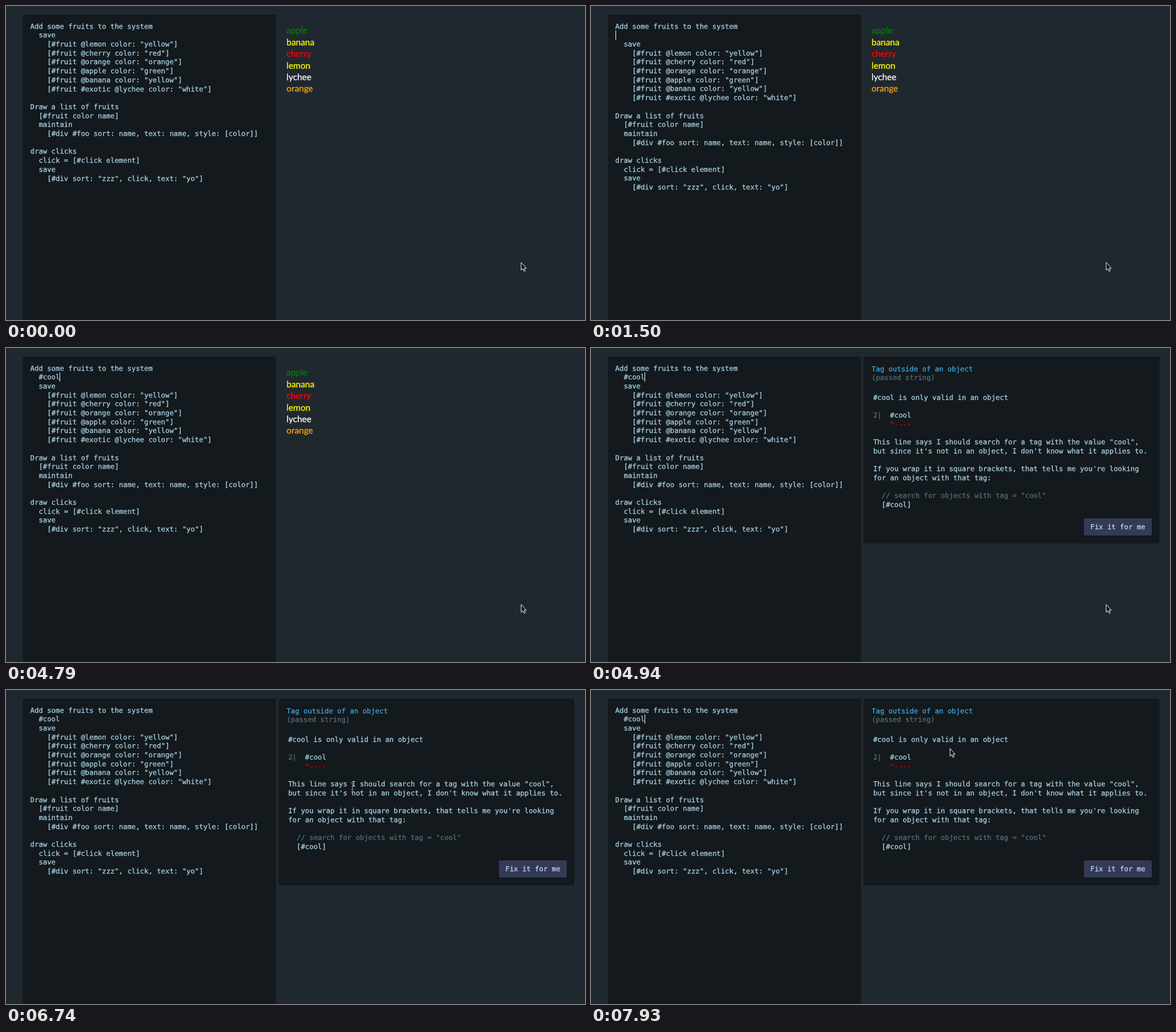
Animation of 1016 by 551 pixels, one loop 8000 ms. Source, as an HTML page:

```html
<!DOCTYPE html>
<html lang="en">
<head>
<meta charset="utf-8">
<title>Live editor</title>
<style>
  html, body { margin: 0; width: 100%; height: 100%; overflow: hidden; background: #20282f; }
  svg { display: block; }
  /* The thin stroke in the text colour gives the heavier, smoothed look. */
  text {
    font: 12.31px "DejaVu Sans Mono", monospace;
    fill: currentColor;
    stroke: currentColor;
    stroke-width: .3px;
    color: #a8d0e6;
    text-rendering: geometricPrecision;
  }
  #fruits text { font: 15.4px Lato, sans-serif; }
  .panel { fill: #13191c; }
</style>
</head>
<body>
<svg id="stage" width="1016" height="551" viewBox="0 0 1016 551">
  <rect class="panel" x="29.7" y="15" width="444" height="550" rx="3"/>
  <g id="code"></g>
  <g id="rest"></g>
  <rect id="caret" width="1" fill="#fff"/>
  <g id="fruits"></g>
  <g id="error">
    <rect class="panel" x="478.5" y="15" width="519" height="328" rx="3"/>
    <rect x="865" y="299" width="119" height="30" rx="2" fill="#343a56"/>
  </g>
  <path id="arrow" d="M0 0V13.6L3 10.9L5.1 15.6L7.2 14.7L5.2 10.2H8.9Z"
        fill="#0b0d0f" stroke="#fff" stroke-linejoin="round"/>
  <path id="beam" d="M-3 -8Q0 -8 0 -6Q0 -8 3 -8M0 -6V6M-3 8Q0 8 0 6Q0 8 3 8M-2 3H2"
        fill="none" stroke="#8a9298"/>
</svg>
<script>
const LOOP = 8000, CHAR = 7.41, LINE = 15.7, LEFT = 42.6, TOP = 39.6;
const $ = id => document.getElementById(id);

function addText(parent, x, y, str, color) {
  const el = document.createElementNS("http://www.w3.org/2000/svg", "text");
  const indent = str.length - str.trimStart().length;
  el.setAttribute("x", x + indent * CHAR);
  el.setAttribute("y", y);
  if (color) el.style.color = color;
  el.textContent = str.trimStart();
  parent.append(el);
  return el;
}

// Editor
const heading = "Add some fruits to the system";
addText($("code"), LEFT, TOP, heading);
const typedLine = addText($("code"), LEFT + 2 * CHAR, TOP + LINE, "");
`  save
    [#fruit @lemon color: "yellow"]
    [#fruit @cherry color: "red"]
    [#fruit @orange color: "orange"]
    [#fruit @apple color: "green"]
    [#fruit @banana color: "yellow"]
    [#fruit #exotic @lychee color: "white"]

Draw a list of fruits
  [#fruit color name]
  maintain
    [#div #foo sort: name, text: name, style: [color]]

draw clicks
  click = [#click element]
  save
    [#div sort: "zzz", click, text: "yo"]`
  .split("\n").forEach((s, i) => addText($("rest"), LEFT, TOP + LINE * (i + 1), s));

// Rendered list
[["apple", "green"], ["banana", "yellow"], ["cherry", "red"],
 ["lemon", "yellow"], ["lychee", "white"], ["orange", "orange"]]
  .forEach(([name, color], i) => addText($("fruits"), 492.3, 48.4 + 20.4 * i, name, color));

// Error message
const GREY = "#526d7d";
const say = (row, str, color) => addText($("error"), 495.2, 90.6 + LINE * row, str, color);
addText($("error"), 492.4, 40.8, "Tag outside of an object", "#40a5e0");
addText($("error"), 492.4, 56.4, "(passed string)", GREY);
say(0, "#cool is only valid in an object");
say(2, "2|", GREY);
say(2, "    #cool");
say(3.05, "    ^----", "#e80000");
say(5, 'This line says I should search for a tag with the value "cool",');
say(6, "but since it's not in an object, I don't know what it applies to.");
say(8, "If you wrap it in square brackets, that tells me you're looking");
say(9, "for an object with that tag:");
say(11, '  // search for objects with tag = "cool"', GREY);
say(12, "  [#cool]");
addText($("error"), 876.3, 318.2, "Fix it for me", "#b9d9ec");

// Timeline
const typed = "\n  #cool";
const keyTimes = [1500, 2850, 3000, 3300, 3590, 3740, 3890, 4040];
const blinkTimes = [150, 600, 1200, 2100, 2550, 4640, 4790, 5390, 5840, 6440, 6890, 7480, 7930];
const errorTime = 4940;
const pointer = [
  [0, 904, 450], [6590, 765, 285], [6740, 608, 171, "beam"], [6890, 606, 128],
  [7040, 614, 110], [7190, 621, 106], [7340, 625, 104], [7480, 627, 104],
  [7630, 628, 103], [7780, 629, 103], [7930, 630, 102.5]
];
const passed = (times, t) => times.filter(at => at <= t).length;
const show = (el, on) => el.setAttribute("visibility", on ? "visible" : "hidden");
const move = (el, x, y) => el.setAttribute("transform", `translate(${x} ${y})`);

function draw(t) {
  const keys = passed(keyTimes, t);
  const line = typed.slice(1, Math.max(1, keys));
  typedLine.textContent = line.trim();
  move($("rest"), 0, keys ? LINE : 0);

  const caret = $("caret");
  const column = keys ? line.length : heading.length;
  caret.setAttribute("x", Math.round(LEFT + column * CHAR));
  caret.setAttribute("y", keys ? 43 : 28);
  caret.setAttribute("height", keys ? 16 : 15);
  show(caret, passed(blinkTimes, t) % 2);

  show($("error"), t >= errorTime);
  show($("fruits"), t < errorTime);

  const [, x, y, shape = "arrow"] = pointer.findLast(p => p[0] <= t);
  for (const id of ["arrow", "beam"]) {
    show($(id), id === shape);
    move($(id), x, y);
  }
}

const start = performance.now();
function tick() {
  draw((performance.now() - start) % LOOP);
  requestAnimationFrame(tick);
}
tick();
</script>
</body>
</html>
```
